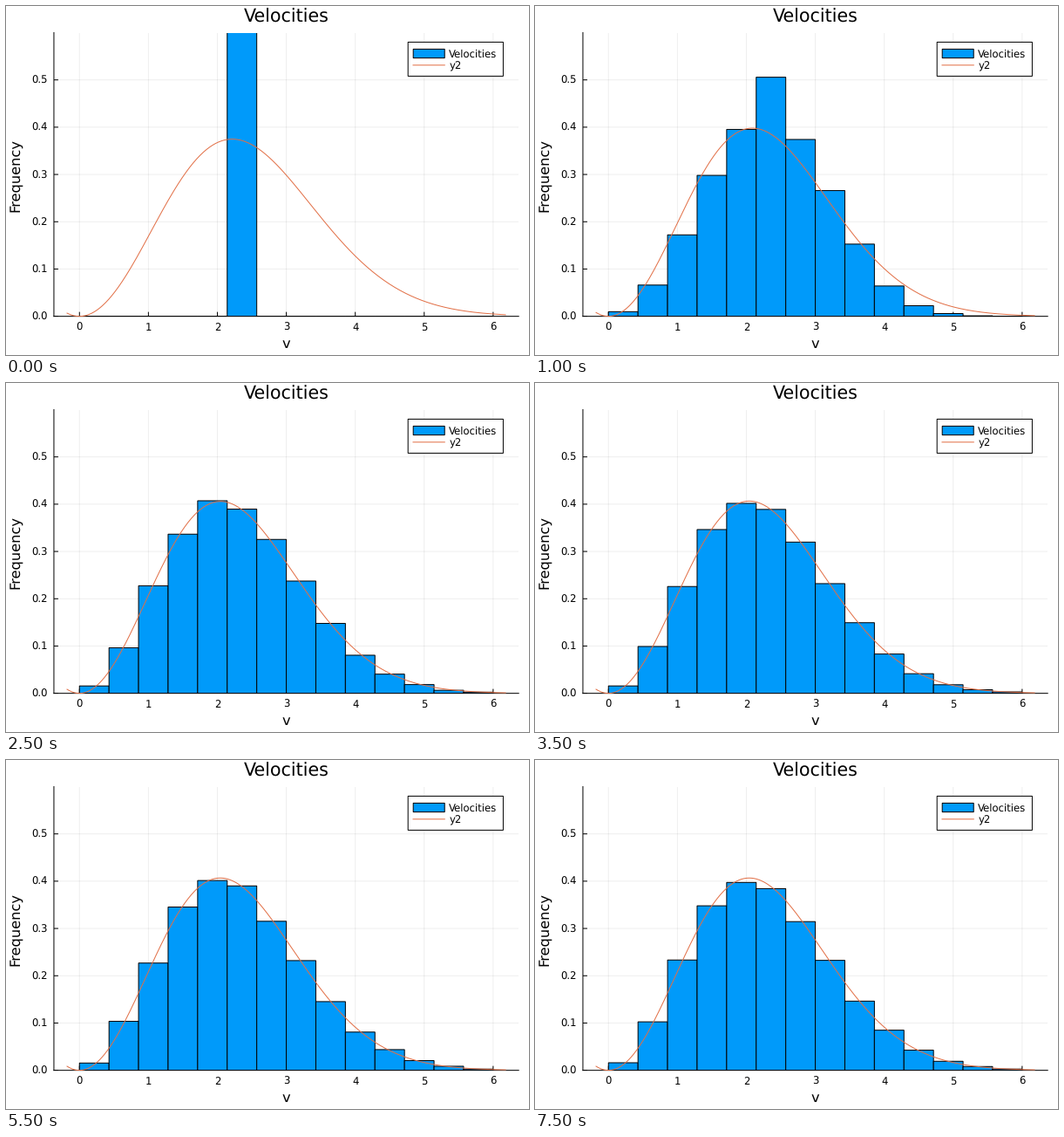
Animation, 600 px wide and 400 px high, one loop 8 s. Source, as a matplotlib script:

```python
from math import exp, gamma, pi, sqrt

import numpy as np
import matplotlib.pyplot as plt
from matplotlib.animation import FuncAnimation
from matplotlib.patches import Rectangle

W, H, PT = 600, 400, 0.72  # stage in pixels, points per pixel
LEFT, RIGHT, TOP, BOTTOM = 54.95, 588.19, 30.5, 355.65
VMIN, VMAX, YMAX = -0.3708, 6.3708, 0.6
XUNIT = (RIGHT - LEFT) / (VMAX - VMIN)
YUNIT = (BOTTOM - TOP) / YMAX
BLUE, ORANGE = "#009afa", "#e26f46"
FRAMES, STEP = 16, 500
BINS, BIN, SUB = 14, 3 / 7, 40
PARTICLES, START_SPEED = 100_000, 2.5

fine = (np.arange(BINS * SUB) + 0.5) * BIN / SUB


def state(n):
    """Share still at the start speed, shape and width of the rest."""
    left = exp(-1.73 * n)
    q = 2 + 5.7 * 0.42 ** n
    w = START_SPEED * sqrt(gamma(3 / q) / gamma(5 / q))  # keeps the energy
    return left, q, w


def heights(n):
    left, q, w = state(n)
    density = q / (w ** 3 * gamma(3 / q)) * fine ** 2 * np.exp(-(fine / w) ** q)
    share = (1 - left) * density.reshape(BINS, SUB).mean(axis=1) * BIN
    share[int(START_SPEED / BIN)] += left
    rest = max(0, 1 - share.sum())
    rng = np.random.default_rng(n)
    share = np.append(share, rest)
    counts = rng.multinomial(PARTICLES, share / share.sum())
    return counts[:BINS] / PARTICLES / BIN


def maxwell(v, n):
    left, q, w = state(n)
    mean = left * START_SPEED + (1 - left) * w * gamma(4 / q) / gamma(3 / q)
    vp = mean * sqrt(pi) / 2
    return 4 / sqrt(pi) / vp ** 3 * v ** 2 * np.exp(-(v / vp) ** 2)


plt.rcParams.update({"font.family": "DejaVu Sans", "text.hinting": "none"})
fig = plt.figure(figsize=(W / 100, H / 100), dpi=100, facecolor="white")
ax = fig.add_axes([LEFT / W, 1 - BOTTOM / H, (RIGHT - LEFT) / W, (BOTTOM - TOP) / H])
ax.set(xlim=(VMIN, VMAX), ylim=(0, YMAX), xticks=[], yticks=[])
for side, spine in ax.spines.items():
    spine.set_visible(side in ("left", "bottom"))
    spine.set_linewidth(PT)

page = fig.add_axes([0, 0, 1, 1])
page.set(xlim=(0, W), ylim=(H, 0))
page.axis("off")


def label(x, y, text, size, ha="center", **kw):
    page.text(x, y, text, fontsize=size * PT, ha=ha, va="baseline", **kw)


def box(x, y, w, h, color):
    page.add_patch(Rectangle((x, y), w, h, fc=color, ec="black", lw=PT))


label(322, 18.3, "Velocities", 20.6)
label(321.5, 391.7, "v", 16.2)
label(16, 193.5, "Frequency", 16.2, rotation=90, rotation_mode="anchor")

grid = dict(color="black", alpha=0.065, lw=PT, zorder=0)
tick = dict(color="black", lw=PT, zorder=1)
for i in range(7):
    ax.vlines(i, 0, YMAX, **grid)
    ax.vlines(i, 0, 5 / YUNIT, **tick)
    label(LEFT + (i - VMIN) * XUNIT, 371.6, str(i), 11.65)
for i in range(6):
    y = i / 10
    ax.hlines(y, VMIN, VMAX, **grid)
    ax.hlines(y, VMIN, VMIN + 5 / XUNIT, **tick)
    label(47.4, BOTTOM + 4.3 - y * YUNIT, f"{y:.1f}", 11.65, "right")

box(461.2, 41.4, 109.2, 39, "white")
box(467.2, 49.4, 36, 10.2, BLUE)
page.plot([467, 503.3], [67.8, 67.8], color=ORANGE, lw=PT)
label(508.4, 58.9, "Velocities", 11.65, "left")
label(508.4, 72.2, "y2", 11.65, "left")

bars = ax.bar(np.arange(BINS) * BIN, np.zeros(BINS), BIN, align="edge",
              color=BLUE, ec="black", lw=PT, zorder=3)
v = np.linspace(-0.18, 6.18, 400)
curve, = ax.plot(v, maxwell(v, 0), color=ORANGE, lw=PT, zorder=4)

ax.set(xlim=(VMIN, VMAX), ylim=(0, YMAX))
for artist in fig.findobj():
    artist.set_snap(False)


def draw(n):
    for bar, h in zip(bars, heights(n)):
        bar.set_height(h)
    curve.set_ydata(maxwell(v, n))
    return [*bars, curve]


anim = FuncAnimation(fig, draw, frames=FRAMES, interval=STEP,
                     repeat=True, repeat_delay=0, blit=False)
plt.show()
```
